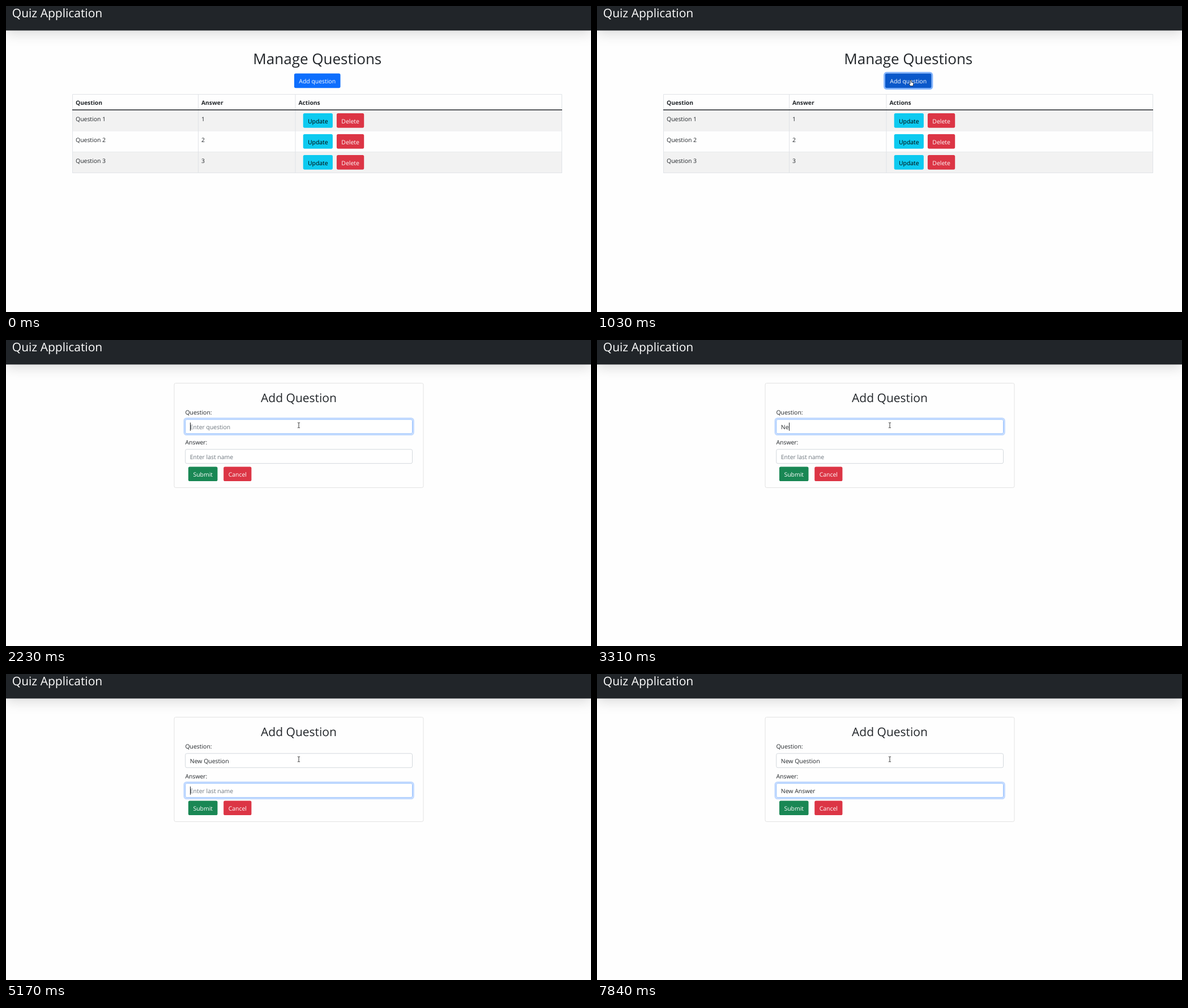
Write an HTML page that moves like this. It is 1033x542 px and loops after 8000 ms.

```html
<!DOCTYPE html>
<html lang="en">
<head>
<meta charset="utf-8">
<title>Quiz Application</title>
<style>
  html, body { margin: 0; width: 100%; height: 100%; overflow: hidden; background: #fefefe; }
  svg { display: block; width: 1033px; height: 542px; }
  text { font: 10.45px "Open Sans", "Noto Sans", sans-serif; fill: #212529; text-rendering: geometricPrecision; white-space: pre; }
  .h1 { font-size: 26px; }
  .h2 { font-size: 21px; }
  .th { font-size: 10.3px; font-weight: 700; }
  .mid { text-anchor: middle; }
  .white { fill: #fff; }
  .black { fill: #000; }
  .hint { fill: #6c757d; }
  .bar { fill: #212529; filter: drop-shadow(0 5.5px 11px rgba(0, 0, 0, .15)); }
  .line { fill: none; stroke: #e0e3e7; }
  .ring { fill: none; stroke: #0d6efd; stroke-opacity: .25; stroke-width: 2.8; }
  .pointer { fill: #fff; stroke: #23262b; stroke-width: .8; stroke-linejoin: round; }
</style>
</head>
<body>
<svg id="stage" viewBox="0 0 1033 542"></svg>
<script>
const stage = document.getElementById('stage');
const LOOP = 8000;
const FORM_AT = 1090;

const text = (x, y, value, cls = '', id = '') =>
  `<text x="${x}" y="${y}" class="${cls}" id="${id}">${value}</text>`;

const button = (x, y, w, label, fill, cls = 'white', id = '') =>
  `<rect id="${id}" x="${x}" y="${y}" width="${w}" height="25.6" rx="2.6" fill="${fill}"/>` +
  text(x + w / 2, y + 17.4, label, `mid ${cls}`);

const ring = (id, x, y, w, h) =>
  `<rect id="${id}" class="ring" x="${x - 1.4}" y="${y - 1.4}" width="${w + 2.8}" height="${h + 2.8}" rx="4"/>`;

const row = n => {
  const y = 147.5 + 37 * n;
  return `<rect x="117" y="${y}" width="865" height="37" fill="${n % 2 ? '#f2f2f2' : '#fefefe'}"/>
    <path class="line" d="M117 ${y + 37}H982"/>` +
    text(123, y + 19.3, `Question ${n}`) + text(345, y + 19.3, n) +
    button(524.7, y + 5.6, 52.2, 'Update', '#0dcaf0', 'black') +
    button(583.9, y + 5.6, 48.3, 'Delete', '#dc3545');
};

const field = (id, y, label, hint) =>
  text(316.4, y - 8.2, label) +
  ring(`${id}Ring`, 316.2, y, 401.8, 26) +
  `<rect id="${id}Box" x="316.7" y="${y + .5}" width="400.8" height="25" rx="2.6" fill="#fff" stroke="#ced4da" stroke-width=".9"/>` +
  text(324.8, y + 17.8, hint, 'hint', `${id}Hint`) +
  text(324.8, y + 17.8, '', '', `${id}Text`);

stage.innerHTML = `
  <rect class="bar" width="1033" height="43.4"/>
  ${text(10.8, 20, 'Quiz Application', 'h2 white')}
  <g id="list">
    ${text(549.8, 103, 'Manage Questions', 'h1 mid')}
    ${ring('addRing', 508.9, 119.6, 81.6, 25.6)}
    ${button(508.9, 119.6, 81.6, 'Add question', '#0d6efd', 'white', 'add')}
    ${[1, 2, 3].map(row).join('')}
    <path class="line" d="M117.5 156.5H981.5V295.5H117.5ZM339.5 156V295M511 156V295"/>
    <path d="M117 184H982" stroke="#212529" stroke-width="1.5"/>
    ${text(123, 175, 'Question', 'th')}${text(345, 175, 'Answer', 'th')}${text(516.4, 175, 'Actions', 'th')}
  </g>
  <g id="form">
    <rect x="297" y="76.5" width="440" height="185" rx="2.6" fill="#fefefe" stroke="#e2e2e2"/>
    ${text(517, 110, 'Add Question', 'h2 mid')}
    ${field('question', 140.3, 'Question:', 'Enter question')}
    ${field('answer', 193.2, 'Answer:', 'Enter last name')}
    ${button(321.9, 224.4, 51.6, 'Submit', '#198754')}
    ${button(384.2, 224.4, 49.2, 'Cancel', '#dc3545')}
    <rect id="caret" width="1" height="14.5" fill="#212529"/>
  </g>
  <path id="arrow" class="pointer" d="M.4 .2V9L2.4 7.2L3.8 10.1L5 9.5L3.7 6.7H6.4Z"/>
  <path id="hand" class="pointer" d="M-1 .8Q0-.4 1 .8V4L4.3 4.9Q5 5.2 4.8 6.3L4 10.6H-.8L-3 6.8Q-2.6 5.6-1 6.8Z"/>
  <path id="beam" d="M-2-4.6Q0-4.6 0-3.6Q0-4.6 2-4.6M0-3.6V3.6M-2 4.6Q0 4.6 0 3.6Q0 4.6 2 4.6" fill="none" stroke="#222" stroke-width=".9"/>`;

const el = {};
stage.querySelectorAll('[id]').forEach(node => { if (node.id) el[node.id] = node; });

// time, shape, x, y
const pointerSteps = [
  [70, 'arrow', 920, 477], [130, 'arrow', 822, 378], [200, 'arrow', 731, 292], [270, 'arrow', 691, 255],
  [470, 'arrow', 685, 250], [540, 'arrow', 667, 234], [600, 'arrow', 641, 211], [670, 'arrow', 609, 182],
  [730, 'arrow', 580, 157], [800, 'hand', 562, 139], [870, 'hand', 554, 131],
  [FORM_AT, 'arrow', 552.8, 129.8],
  [1950, 'arrow', 546, 134], [2020, 'beam', 526, 147], [2090, 'beam', 517, 151]
];

// time, focused field, typed length, caret shown
const typingSteps = [[2160, 'question', 0, 1], [2760, 'question', 0, 0]];
const values = { question: 'New Question', answer: 'New Answer' };
const keyTimes = {
  question: [2960, 3240, 3640, 3840, 4170, 4370, 4440, 4510, 4640, 4710, 4830, 4900],
  answer: [5650, 5920, 6050, 6250, 6650, 6980, 7110, 7310, 7380, 7580]
};
const addKeys = id => keyTimes[id].forEach((t, i) =>
  typingSteps.push([t, id, i + 1, values[id][i] === ' ' ? 0 : 1]));
addKeys('question');
typingSteps.push([5170, 'answer', 0, 1]);
addKeys('answer');
typingSteps.push([7840, 'answer', values.answer.length, 0]);

const latest = (steps, t) => steps.filter(step => step[0] <= t).pop();
const show = (node, on) => { node.style.display = on ? '' : 'none'; };

function drawField(id, focus, t) {
  const typed = values[id].slice(0, keyTimes[id].filter(k => k <= t).length);
  el[`${id}Text`].textContent = typed;
  show(el[`${id}Hint`], !typed);
  show(el[`${id}Ring`], focus === id);
  el[`${id}Ring`].style.opacity = t < 2230 ? .5 : 1;
  el[`${id}Box`].setAttribute('stroke', focus === id ? '#86b7fe' : '#ced4da');
}

function draw(t) {
  show(el.list, t < FORM_AT);
  show(el.form, t >= FORM_AT);
  show(el.addRing, t >= 960);
  el.addRing.style.strokeOpacity = .5;
  el.add.setAttribute('fill', t < 800 ? '#0d6efd' : t < 960 ? '#0b5ed7' : '#0a58ca');

  const [, shape, x, y] = latest(pointerSteps, t) || [];
  for (const id of ['arrow', 'hand', 'beam']) show(el[id], id === shape);
  if (shape) el[shape].setAttribute('transform', `translate(${x} ${y})`);

  const [, focus, length, caretOn] = latest(typingSteps, t) || [];
  drawField('question', focus, t);
  drawField('answer', focus, t);
  show(el.caret, caretOn);
  if (caretOn) {
    const width = length ? el[`${focus}Text`].getComputedTextLength() : 0;
    el.caret.setAttribute('x', Math.round(324.8 + width));
    el.caret.setAttribute('y', focus === 'question' ? 146.3 : 199.3);
  }
}

const start = performance.now();
function tick() {
  draw((performance.now() - start) % LOOP);
  requestAnimationFrame(tick);
}
tick();
</script>
</body>
</html>
```
